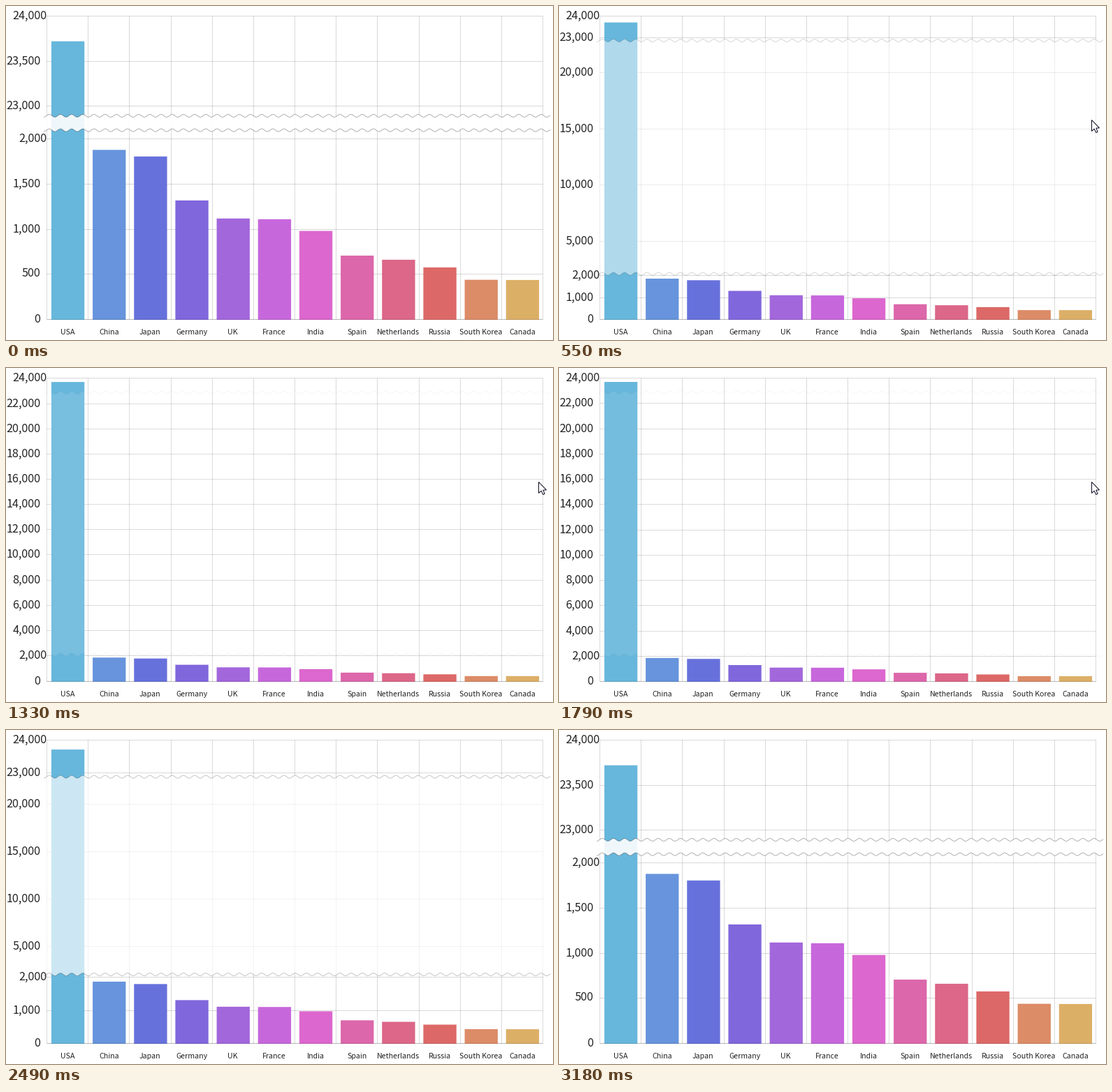
Animation of 783x479 px, one loop 4510 ms. Source, as a matplotlib script:

```python
import numpy as np
import matplotlib.pyplot as plt
from matplotlib.animation import FuncAnimation
from matplotlib.patches import Polygon, Rectangle

W, H, DPI = 783, 479, 64
PT = 72 / DPI                      # points per pixel
FRAMES, INTERVAL = 205, 22
FONT = "Noto Sans CJK JP"

LEFT, RIGHT, TOP, BASE = 58.5, 768.5, 14.5, 449.5
HEIGHT = BASE - TOP
SHIFT = 0.5                        # shapes sit half a pixel off the grid lines
V_MAX, LOW, HIGH = 24000, 2100, 22900
SPAN = HIGH - LOW
CLOSED = 0.05 * (V_MAX - SPAN) / SPAN   # relative size of the closed break

DATA = [("USA", 23725, "#67b7dc"), ("China", 1882, "#6794dc"),
        ("Japan", 1809, "#6771dc"), ("Germany", 1322, "#8067dc"),
        ("UK", 1122, "#a367dc"), ("France", 1114, "#c767dc"),
        ("India", 984, "#dc67ce"), ("Spain", 711, "#dc67ab"),
        ("Netherlands", 665, "#dc6788"), ("Russia", 580, "#dc6967"),
        ("South Korea", 443, "#dc8c67"), ("Canada", 441, "#dcaf67")]
CELL = (RIGHT - LEFT) / len(DATA)

ENTER, LEAVE = 170, 2110           # pointer enters and leaves the plot
OPEN_AT, OPEN_MS = 238, 1500
CLOSE_AT, CLOSE_MS = 2149, 1000


def cubic_out(p):
    return 1 - (1 - min(max(p, 0), 1)) ** 3


def hold(t):
    """Hold the time at the steps in which the picture refreshes."""
    t += 20
    if t < ENTER:
        return 0
    start, step = (ENTER, 77) if t < LEAVE else (LEAVE, 76.6)
    return start + step * int((t - start) / step)


def openness(t):
    if t < LEAVE:
        return cubic_out((t - OPEN_AT) / OPEN_MS)
    return 1 - cubic_out((t - CLOSE_AT) / CLOSE_MS)


def scale(size):
    """Return pixels per unit and a function from value to y."""
    k = HEIGHT / (V_MAX - SPAN * (1 - size))

    def to_y(v):
        inside = min(max(v - LOW, 0), SPAN)
        return BASE - k * (v - inside * (1 - size))
    return k, to_y


def grid_values(k, size):
    units = HEIGHT / k
    step = 500 if units <= 7250 else 1000 if units <= 14500 else 2000
    shown = {v for v in range(0, V_MAX + 1, step) if v <= LOW or v >= HIGH}
    length = k * size * SPAN
    if length > 160:
        inner = 2000 if length > 370 else 5000
        shown |= {v for v in range(0, V_MAX, inner) if LOW < v < HIGH}
    return shown


fig = plt.figure(figsize=(W / DPI, H / DPI), dpi=DPI, facecolor="white")
ax = fig.add_axes([0, 0, 1, 1])
ax.set_xlim(0, W)
ax.set_ylim(H, 0)
ax.axis("off")


def line(xs, ys, alpha, z):
    return ax.plot(xs, ys, color="black", alpha=alpha, lw=PT, zorder=z,
                   solid_capstyle="butt", snap=False)[0]


def label(x, y, text, px, align):
    return ax.text(x, y, text, family=FONT, size=px * PT, ha=align,
                   va="baseline", color="#222222", zorder=6)


for i in range(len(DATA) + 1):
    x = int(LEFT + i * CELL) + 0.5
    line([x, x], [TOP, BASE], 0.15, 1)
line([LEFT, RIGHT], [BASE, BASE], 0.15, 3)

bars = []
for i, (name, value, color) in enumerate(DATA):
    mid = LEFT + (i + 0.5) * CELL
    bar = Rectangle((mid - 0.4 * CELL + SHIFT, BASE), 0.8 * CELL, 0,
                    facecolor=color, edgecolor="none", zorder=2, snap=False)
    bars.append(ax.add_patch(bar))
    label(mid, 471, name, 10.6, "center")

rows = {}
for v in range(0, V_MAX + 1, 500):
    if v <= LOW or v >= HIGH or v % 2000 == 0 or v % 5000 == 0:
        right = 58 if v in (2000, V_MAX) else 49.5
        rows[v] = (line([LEFT, RIGHT], [BASE, BASE], 0.15, 1),
                   label(right, 0, f"{v:,}", 16.2, "right"))

wave_x = np.arange(54, 779.5, 1.0)
wave_y = SHIFT - 2 * np.cos(2 * np.pi * (wave_x - 62) / 16)
gap = ax.add_patch(Polygon([[0, 0]], closed=True, facecolor="white",
                           edgecolor="none", zorder=4))
waves = [line(wave_x, wave_y, 0.3, 5) for _ in range(2)]

ARROW = [(0, 0), (0, 16), (3.7, 12.6), (6.2, 18), (8.6, 17),
         (6.4, 11.6), (11, 11.4)]
pointer = ax.add_patch(Polygon(np.array(ARROW) + (762.5, 163.5), closed=True,
                               facecolor="white", edgecolor="#0b0b20",
                               lw=PT, zorder=7))


def draw(frame):
    t = hold(frame * INTERVAL)
    opened = openness(t)
    size = CLOSED + (1 - CLOSED) * opened
    k, to_y = scale(size)

    shown = grid_values(k, size)
    for v, (rule, text) in rows.items():
        y = int(to_y(v) + 1e-6) + 0.5
        rule.set_ydata([y, y])
        text.set_y(y + 4)
        rule.set_visible(v in shown)
        text.set_visible(v in shown)

    for bar, (_, value, _) in zip(bars, DATA):
        y = to_y(value) + SHIFT
        bar.set_y(y)
        bar.set_height(BASE + SHIFT - y)

    alpha = 1 - 0.9 * opened
    edges = [wave_y + to_y(HIGH), wave_y + to_y(LOW)]
    gap.set_xy(np.column_stack([np.r_[wave_x, wave_x[::-1]],
                                np.r_[edges[0], edges[1][::-1]]]))
    gap.set_alpha(0.9 * alpha)
    for wave, edge in zip(waves, edges):
        wave.set_ydata(edge)
        wave.set_alpha(0.3 * alpha)

    pointer.set_visible(ENTER <= t < LEAVE)
    return []


anim = FuncAnimation(fig, draw, frames=FRAMES, interval=INTERVAL,
                     init_func=lambda: draw(0), repeat=True, repeat_delay=0,
                     blit=False)
plt.show()
```
